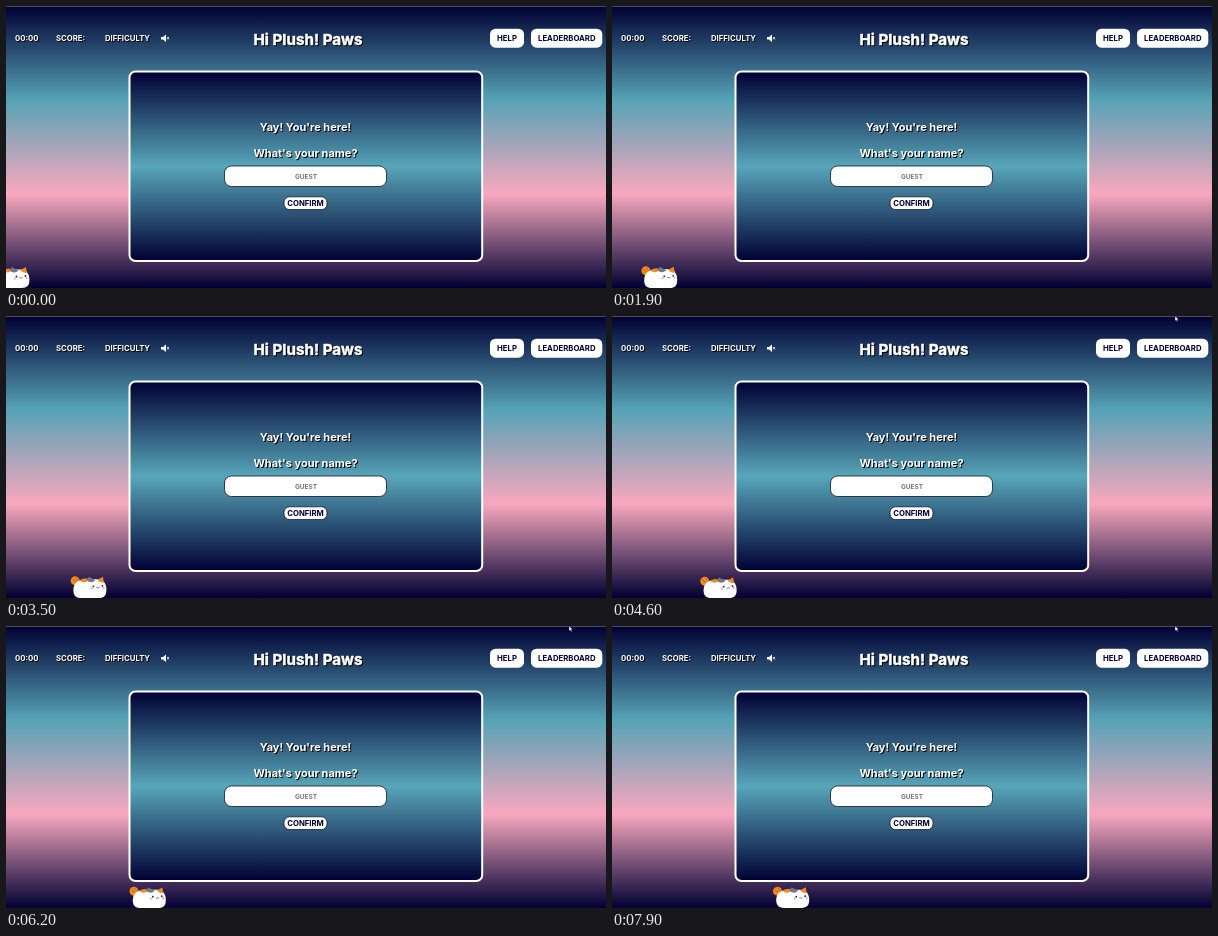
Recreate the animation shown at these times as an HTML page. Size 600 px wide and 282 px high, loop 8000 ms.

```html
<!DOCTYPE html>
<html lang="en">
<head>
<meta charset="utf-8">
<title>Hi Plush! Paws</title>
<style>
  html, body { margin: 0; width: 100%; height: 100%; overflow: hidden; background: #000033; }
  svg { display: block; width: 600px; height: 282px; }
  text { font: 700 7.75px Inter, "Open Sans", sans-serif; fill: #fff; }
  .shade { filter: drop-shadow(1px 1px 0 #000); }
  .title { font-size: 15.2px; stroke: #fff; stroke-width: .5; stroke-linejoin: round; }
  .line { font-size: 11px; }
  .mid { text-anchor: middle; }
  .dark { fill: #000033; }
  .hint { font-size: 6.5px; fill: #777; }
  .box { fill: #fff; }
  .rim { stroke: #111133; stroke-width: .8; }
</style>
</head>
<body>
<svg viewBox="0 0 600 282">
  <defs>
    <linearGradient id="sky" x2="0" y2="1">
      <stop stop-color="#000033"/>
      <stop offset=".333" stop-color="#56a3b6"/>
      <stop offset=".667" stop-color="#f8a8be"/>
      <stop offset="1" stop-color="#000033"/>
    </linearGradient>
    <linearGradient id="deep" x2="0" y2="1">
      <stop stop-color="#000033"/>
      <stop offset=".5" stop-color="#58a6b9"/>
      <stop offset="1" stop-color="#000033"/>
    </linearGradient>
  </defs>

  <rect width="600" height="282" fill="url(#sky)"/>
  <rect width="600" height="1" fill="#4a4a58"/>

  <g class="shade">
    <text x="9" y="35.3">00:00</text>
    <text x="50" y="35.3">SCORE:</text>
    <text x="99" y="35.3">DIFFICULTY</text>
    <text class="title mid" x="302" y="38.5">Hi Plush! Paws</text>
  </g>
  <path d="M155 31h2l3-2.5v7.5l-3-2.5h-2z" fill="#fff"/>
  <path d="M161 31l2 2.4m0-2.4l-2 2.4" stroke="#fff" stroke-width=".8"/>

  <rect class="box" x="484" y="22.7" width="34" height="19" rx="5.5"/>
  <text class="dark mid" x="501" y="35.3">HELP</text>
  <rect class="box" x="525" y="22.7" width="71.3" height="19" rx="5.5"/>
  <text class="dark mid" x="560.8" y="35.3">LEADERBOARD</text>

  <rect x="123.5" y="65.5" width="352.7" height="189.5" rx="6" fill="url(#deep)" stroke="#fff" stroke-width="2"/>
  <g class="shade">
    <text class="line mid" x="299.5" y="124.7">Yay! You're here!</text>
    <text class="line mid" x="299.5" y="150.7">What's your name?</text>
  </g>
  <rect class="box rim" x="218.5" y="160" width="162" height="20.5" rx="7"/>
  <text class="hint mid" x="300" y="172.8">GUEST</text>
  <rect class="box rim" x="278" y="190.8" width="43" height="12.8" rx="5.5"/>
  <text class="dark mid" x="299.5" y="200.2">CONFIRM</text>

  <!-- Cat: x = 0 is its right side, y = 0 the floor -->
  <g id="cat">
    <g id="tail">
      <circle cx="-31.5" cy="-17" r="4.5" fill="#f28a1c"/>
      <path d="M-34-18.5l4 3m-1-5l3 4" stroke="#b85b12" stroke-width=".8"/>
    </g>
    <g id="body">
      <path d="M-33-8C-33-15-28-18.5-20-18.5H-9C-2-18.5 0-13 0-8S-2 0-8 0H-25C-31 0-33-3-33-8Z" fill="#fff"/>
      <path d="M-27-17.5q5 4 9 0l-2-2q-4 0-7 2z" fill="#f28a1c"/>
      <path d="M-20-17.5l2.5-3.5 6.5 3.5q-4 4-9 0z" fill="#737782"/>
      <path d="M-9-18l5.5-3 1 6q-4.5 0-6.5-3z" fill="#f28a1c"/>
      <g fill="#222">
        <circle cx="-13" cy="-11.5" r=".9"/>
        <circle cx="-4" cy="-12" r=".9"/>
        <path d="M-10-10.5q.8 1.2 1.6 0 .8 1.2 1.6 0" fill="none" stroke="#222" stroke-width=".6"/>
      </g>
      <g fill="#f7a8bd">
        <circle cx="-14.5" cy="-9.5" r="1.1"/>
        <circle cx="-2.7" cy="-10" r="1.1"/>
      </g>
    </g>
  </g>

  <path id="cursor" d="M0 0v5l1.2-1 .9 1.7.9-.5-.8-1.6h1.6z" fill="#fff" stroke="#000" stroke-width=".4"/>
</svg>
<script>
  const LOOP = 8000, STEP = 100;
  const [cat, tail, body, cursor] = ["cat", "tail", "body", "cursor"].map(id => document.getElementById(id));
  const place = (el, value) => el.setAttribute("transform", value);

  function draw(now) {
    const t = Math.floor(now % LOOP / STEP) * STEP;
    const sway = Math.sin(t / 800 * Math.PI * 2);
    place(cat, `translate(${23.4 + t * 0.022} 282)`);
    place(body, `scale(1 ${1 + 0.02 * sway})`);
    place(tail, `rotate(${4 * sway} -28 -12)`);

    // The pointer slips in from the top edge and rests there.
    const k = Math.min(1, Math.max(0, (t - 4000) / 300));
    place(cursor, `translate(${575 - 12 * k} ${-7 + 7 * k})`);
  }

  const start = performance.now();
  function tick() {
    draw(performance.now() - start);
    requestAnimationFrame(tick);
  }
  tick();
</script>
</body>
</html>
```
